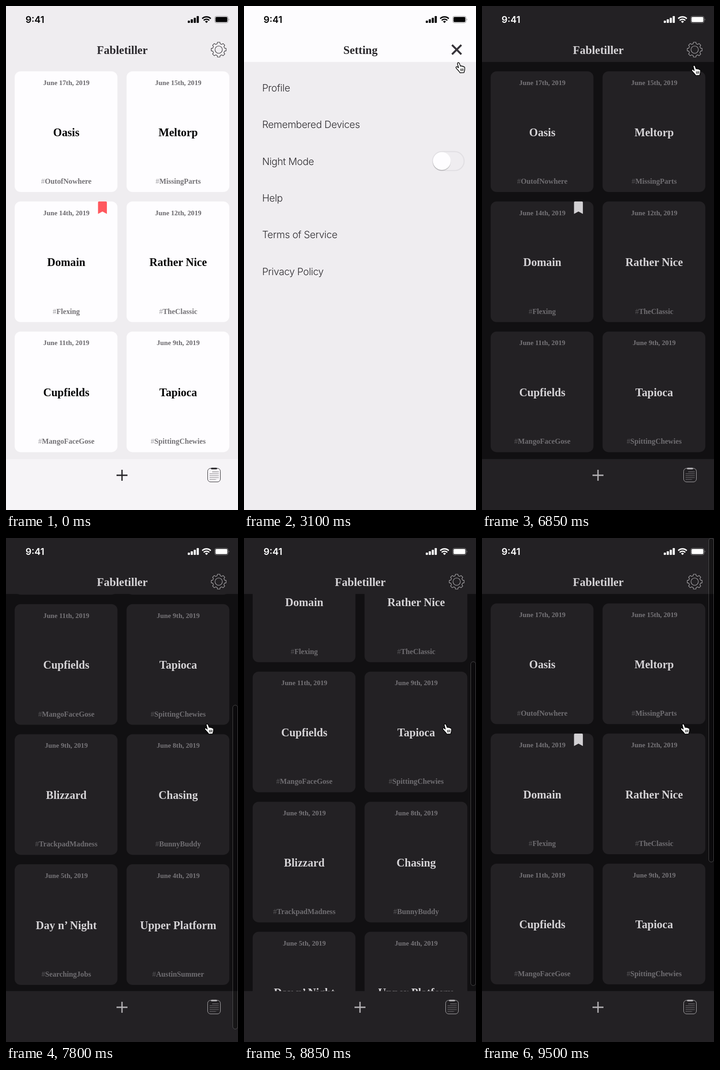
Animation of 508 by 1103 pixels, one loop 9.95 s. Source, as an HTML page:

```html
<!DOCTYPE html>
<html lang="en">
<head>
<meta charset="utf-8">
<title>Night mode</title>
<style>
  html, body { margin: 0; width: 100%; height: 100%; overflow: hidden; background: var(--bg); }
  svg { display: block; width: 508px; height: 1103px; }
  text { font-family: "Liberation Serif", "Noto Serif", serif; font-weight: 700; }
  .mid text, text.mid { text-anchor: middle; }
  .sans, .sans text { font-family: Inter, "Liberation Sans", sans-serif; }
  .line { fill: none; stroke: var(--icon); }
  .bg { fill: var(--bg); }
  .bar { fill: var(--bar); }
  .heading { font-size: 25px; fill: var(--title); }
  .card rect { fill: var(--card); }
  .name { font-size: 24.6px; fill: var(--name); }
  .date { font-size: 15.2px; fill: var(--date); }
  .tag { font-size: 16.2px; fill: var(--tag); }
  .hash { font-weight: 400; fill-opacity: .7; }
  .end { font-size: 12.2px; font-weight: 400; fill: var(--title); }
  #menu text { font-size: 21.6px; letter-spacing: -.018em; fill: var(--menu); }
  .status { fill: var(--status); }
</style>
</head>
<body>
<svg viewBox="0 0 508 1103">
  <g id="home">
    <rect class="bg" width="508" height="1103"/>
    <g id="list" class="mid"></g>
    <rect width="508" height="122.5" fill="var(--homeBar)"/>
    <text class="heading mid" x="254.5" y="104.5">Fabletiller</text>
    <g class="line" stroke-width="1.1" stroke-linejoin="round">
      <path id="gear"/>
      <circle cx="465.7" cy="95.5" r="8"/>
    </g>
    <rect y="991.5" width="508" height="112" fill="var(--footer)"/>
    <path d="M242 1027h24M254 1015v24" fill="none" stroke="var(--plus)" stroke-width="2.8"/>
    <g class="line">
      <rect x="441.5" y="1011.8" width="28" height="29.7" rx="6.5"/>
      <path d="M450.5 1012.2h10" stroke-width="3.6" stroke-linecap="round"/>
      <path stroke-width="1.3" stroke-dasharray="1.4 1.6"
        d="M452.5 1019.5h13M446.5 1023.7h19M446.5 1027.9h19M446.5 1032.1h19M446.5 1036.3h13"/>
    </g>
  </g>

  <g id="settings">
    <rect class="bg" width="508" height="1103"/>
    <rect class="bar" width="508" height="122.5"/>
    <text class="heading mid" x="255" y="104.5">Setting</text>
    <path d="M455.5 85.3l20.4 20.4M475.9 85.3l-20.4 20.4" fill="none" stroke="var(--cross)" stroke-width="4.1"/>
    <g id="menu" class="sans"></g>
    <rect id="track" x="413" y="318.6" width="69" height="41.6" rx="20.8" stroke-width="2.2"
      fill="var(--track)" stroke="var(--rim)"/>
    <circle id="knobShadow" cy="341.3" r="19.5" fill="#000"/>
    <circle id="knob" cy="339.2" r="19.5" fill="#fefdff"/>
  </g>

  <g class="status">
    <text class="sans" x="42.7" y="36.8" font-size="20.4" style="font-weight:600">9:41</text>
    <g id="signal"></g>
    <g fill="none" stroke="var(--status)" stroke-width="2.9">
      <path d="M429.6 27.6a13.4 13.4 0 0 1 18.8 0M432.9 31.4a8.6 8.6 0 0 1 12.2 0"/>
    </g>
    <path d="M439 37.2l-3.2-3.3a4.6 4.6 0 0 1 6.4 0z"/>
    <rect x="457" y="22.4" width="29.4" height="14.6" rx="4" fill="none" stroke="var(--status)" opacity=".4"/>
    <rect x="458.7" y="24.1" width="26" height="11.2" rx="2.4"/>
    <path d="M487.7 27.3q2 2.4 0 4.8z" opacity=".5"/>
  </g>

  <rect id="thumb" x="496.5" width="11" rx="5.5" fill="#000" fill-opacity=".35" stroke="#fff" stroke-opacity=".24"/>

  <g id="hand" fill="#fff" stroke="#000" stroke-width="1.5" stroke-linejoin="round" stroke-linecap="round">
    <path d="M4.5 3.8C4 .8 7.5 0 8.6 2.6L11 8.8C12 7.5 14 7.7 14.4 9.2C15.6 8.2 17.4 8.8 17.6 10.2C19 9.6 20.4 10.5 20.4 12.2L20.2 17L18.6 22.7L10 23.2C8.5 20 4 16.5 1.4 12.7C.3 10.3 2.6 8.8 4.4 10.4L6.8 12.2Z"/>
    <path d="M11.3 14.5l.6 4.5M14 14.2l.3 4.6M16.7 14v4.5" stroke-width="1.2"/>
  </g>
</svg>
<script>
const LOOP = 9950, STEP = 50;
const ROW = 284.7, TOP = 143, MAX_SCROLL = 611, VIEW = 1103, CONTENT = VIEW + MAX_SCROLL;

// name: [day colour, night colour]
const THEME = {
  bg: ["#efedf0", "#111012"], bar: ["#fdfcfe", "#232124"], homeBar: ["#efedf0", "#232124"],
  footer: ["#f6f4f7", "#232124"], card: ["#fefdff", "#232124"], title: ["#2b292d", "#d5d3d6"],
  name: ["#040405", "#d5d3d6"], date: ["#6b696d", "#777579"], tag: ["#747276", "#6f6d71"],
  mark: ["#ff585e", "#d2d0d3"], icon: ["#2a282c", "#b4b2b5"], plus: ["#242226", "#b4b2b5"],
  cross: ["#37343a", "#a8a6a9"], menu: ["#2d2b2f", "#d0ced1"], status: ["#050506", "#ffffff"],
  track: ["#efedf0", "#05d74d"], rim: ["#e1dfe3", "#05d74d"],
};

const CARDS = [
  ["17th", "Oasis", "OutofNowhere"], ["15th", "Meltorp", "MissingParts"],
  ["14th", "Domain", "Flexing"], ["12th", "Rather Nice", "TheClassic"],
  ["11th", "Cupfields", "MangoFaceGose"], ["9th", "Tapioca", "SpittingChewies"],
  ["9th", "Blizzard", "TrackpadMadness"], ["8th", "Chasing", "BunnyBuddy"],
  ["5th", "Day n’ Night", "SearchingJobs"], ["4th", "Upper Platform", "AustinSummer"],
];
const MENU = ["Profile", "Remembered Devices", "Night Mode", "Help", "Terms of Service", "Privacy Policy"];

// time, left, top of the pointer
const HAND = [
  [1450, 487, 125], [1600, 462, 99], [3050, 462, 99], [3100, 463, 123], [3250, 450, 255],
  [3350, 440, 312], [3450, 440, 326], [5250, 440, 326], [5350, 438, 334], [5550, 449, 210],
  [5650, 456, 138], [5750, 460, 115], [6800, 460, 115], [6850, 458, 129], [7000, 443, 340],
  [7100, 434, 406],
];

const $ = id => document.getElementById(id);
const clamp = v => Math.min(1, Math.max(0, v));
const lerp = (a, b, k) => a + (b - a) * k;
const smooth = k => k * k * (3 - 2 * k);
const ramp = (t, from, to) => clamp((t - from) / (to - from));

function mix([day, night], k) {
  const part = (c, i) => parseInt(c.slice(i, i + 2), 16);
  return `rgb(${[1, 3, 5].map(i => Math.round(lerp(part(day, i), part(night, i), k)))})`;
}

function build() {
  $("list").innerHTML = CARDS.map(([day, name, tag], i) => {
    const x = i % 2 ? 264 : 19, y = TOP + ROW * Math.floor(i / 2), cx = x + 113;
    return `<g class="card"><rect x="${x}" y="${y}" width="225" height="264" rx="13"/>
      <text class="date" x="${cx}" y="${y + 30}">June ${day}, 2019</text>
      <text class="name" x="${cx}" y="${y + 141.5}">${name}</text>
      <text class="tag" x="${cx}" y="${y + 246}"><tspan class="hash">#</tspan>${tag}</text></g>`;
  }).join("") +
    `<path d="M201.5 455V430q0-2.2 2.2-2.2h15q2.2 0 2.2 2.2v25l-9.7-5.2z" fill="var(--mark)"/>
     <text class="end" x="254.7" y="1578">- You’ve reached the end -</text>`;

  $("menu").innerHTML = MENU.map((label, i) =>
    `<text x="39.7" y="${186.8 + 80.35 * i}">${label}</text>`).join("");

  $("signal").innerHTML = [5, 8, 11.2, 15].map((h, i) =>
    `<rect x="${398 + 6.5 * i}" y="${37 - h}" width="4.7" height="${h}" rx="1.2"/>`).join("");

  const points = [];
  for (let k = 0; k < 8; k++) {
    for (const [turn, r] of [[-.26, 13.2], [-.16, 16.5], [.16, 16.5], [.26, 13.2]]) {
      const a = k * Math.PI / 4 + turn;
      points.push(`${(465.7 + r * Math.sin(a)).toFixed(2)} ${(95.5 - r * Math.cos(a)).toFixed(2)}`);
    }
  }
  $("gear").setAttribute("d", `M${points.join("L")}Z`);
}

// Distance of a flick: quick travel past the edge, then a decaying bounce.
function flick(u) {
  const peak = 260, over = 80;
  if (u <= 0) return 0;
  if (u < peak) return (MAX_SCROLL + over) * smooth(u / peak);
  return MAX_SCROLL + over * Math.exp((peak - u) / 87);
}

function scrollAt(t) {
  return t < 8800 ? flick(t - 7610) : MAX_SCROLL - flick(t - 8760);
}

function handAt(t) {
  const next = HAND.findIndex(key => key[0] > t);
  if (next < 0) return HAND[HAND.length - 1].slice(1);
  const a = HAND[next - 1], b = HAND[next], k = ramp(t, a[0], b[0]);
  return [lerp(a[1], b[1], k), lerp(a[2], b[2], k)];
}

function set(id, attrs) {
  for (const key in attrs) $(id).setAttribute(key, attrs[key]);
}

function render(t) {
  const night = smooth(ramp(t, 4000, 4150));
  for (const key in THEME) {
    document.documentElement.style.setProperty("--" + key, mix(THEME[key], night));
  }

  const shown = ramp(t, 1800, 1950) - ramp(t, 5850, 6050);
  set("settings", { opacity: shown, visibility: shown > 0 ? "visible" : "hidden" });
  for (const label of $("menu").children) label.style.fontWeight = night > .5 ? 400 : 300;

  const knobX = lerp(433.2, 461.3, night);
  set("knob", { cx: knobX });
  set("knobShadow", { cx: knobX, opacity: .18 * (1 - night) });

  const scroll = scrollAt(t), ratio = VIEW / CONTENT;
  set("list", { transform: `translate(0 ${(-scroll).toFixed(2)})` });
  const from = Math.max(0, scroll * ratio), to = Math.min(VIEW, (scroll + VIEW) * ratio);
  set("thumb", { y: from + .5, height: to - from - 1, visibility: t >= 7650 ? "visible" : "hidden" });

  const visible = t >= HAND[0][0];
  set("hand", { visibility: visible ? "visible" : "hidden" });
  if (visible) set("hand", { transform: `translate(${handAt(t)})` });
}

build();
const start = performance.now();
function frame() {
  const t = (performance.now() - start) % LOOP;
  render(Math.floor(t / STEP) * STEP);
  requestAnimationFrame(frame);
}
frame();
</script>
</body>
</html>
```
